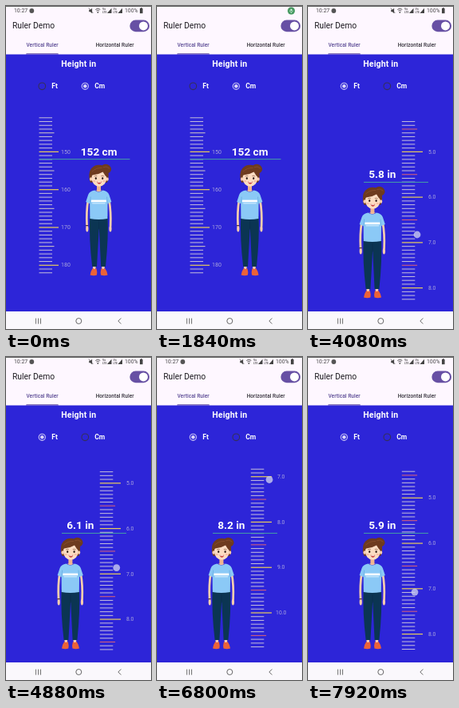
An HTML page with a canvas that plays this animation: 182 px wide and 404 px high, repeating every 8000 ms.

```html
<!DOCTYPE html>
<html lang="en">
<head>
<meta charset="utf-8">
<title>Ruler Demo</title>
<style>
  html, body { margin: 0; width: 100%; height: 100%; overflow: hidden; background: #fef7ff; }
  canvas { display: block; width: 182px; height: 404px; }
</style>
</head>
<body>
<canvas id="stage"></canvas>
<script>
const W = 182, H = 404, LOOP = 8000;
const STEP = 4.73, RULER_TOP = 139.8;
const BLUE = '#2d25d8', PURPLE = '#6750a4', INK = '#1d1b20';
const MIC_ON = 480, MIC_OFF = 2080, TO_FEET = 1920, TOUCH = 3840;

// [time, first visible inch, finger x, finger y]
const DRAG = [
  [4080, 51, 137, 286],
  [5600, 64.7, 140.5, 227],
  [6800, 81.9, 141, 153.5],
  [6920, 82.2, 141, 152.5],
  [7920, 52.3, 134, 294],
  [8000, 51.6, 134, 297]
];

const canvas = document.getElementById('stage');
const c = canvas.getContext('2d');
const dpr = window.devicePixelRatio || 1;
canvas.width = W * dpr;
canvas.height = H * dpr;

// Monotone cubic through one column of the drag keys
function track(t, col) {
  const k = DRAG, last = k.length - 1;
  if (t <= k[0][0]) return k[0][col];
  if (t >= k[last][0]) return k[last][col];
  let i = 0;
  while (t > k[i + 1][0]) i++;
  const rate = j => (k[j + 1][col] - k[j][col]) / (k[j + 1][0] - k[j][0]);
  const slope = j => {
    if (j === 0 || j === last) return 0;
    const a = rate(j - 1), b = rate(j);
    return a * b <= 0 ? 0 : 2 * a * b / (a + b);
  };
  const h = k[i + 1][0] - k[i][0], u = (t - k[i][0]) / h;
  const u2 = u * u, u3 = u2 * u;
  return (2 * u3 - 3 * u2 + 1) * k[i][col] + (u3 - 2 * u2 + u) * h * slope(i) +
         (3 * u2 - 2 * u3) * k[i + 1][col] + (u3 - u2) * h * slope(i + 1);
}

function rect(x, y, w, h, fill) {
  c.fillStyle = fill;
  c.fillRect(x, y, w, h);
}

function oval(x, y, rx, ry, fill, turn = 0) {
  c.beginPath();
  c.ellipse(x, y, rx, ry, turn, 0, Math.PI * 2);
  c.fillStyle = fill;
  c.fill();
}

function ring(x, y, r, color, width) {
  c.beginPath();
  c.arc(x, y, r, 0, Math.PI * 2);
  c.strokeStyle = color;
  c.lineWidth = width;
  c.stroke();
}

function path(d, fill, stroke, width = 1) {
  const p = new Path2D(d);
  if (fill) { c.fillStyle = fill; c.fill(p); }
  if (stroke) { c.strokeStyle = stroke; c.lineWidth = width; c.stroke(p); }
}

function text(s, x, y, size, color, weight = 400, align = 'left', gap = 0) {
  c.font = `${weight} ${size}px Roboto, sans-serif`;
  c.letterSpacing = gap + 'px';
  c.textAlign = align;
  c.fillStyle = color;
  c.fillText(s, x, y);
}

function signal(x) {
  text('Vo', x, 5.3, 3.6, '#444', 500);
  text('LTE', x, 8.9, 3.4, '#444', 500);
  path(`M${x + 6} 9 L${x + 11.5} 9 V2.8 Z`, '#444');
}

function statusBar(t) {
  rect(0, 0, W, 1, '#666');
  if (t >= MIC_ON && t < MIC_OFF) {
    oval(168.5, 6, 4.8, 4.8, '#46996150');
    oval(168.5, 6, 4.5, 4.5, '#469961');
    path('M168.5 3.8 V6', null, '#e8fff0', 1.8);
    path('M166.5 5.6 Q166.6 7.7 168.5 7.7 Q170.4 7.7 170.5 5.6 M168.5 7.7 V9', null, '#e8fff0', .6);
    return;
  }
  text('10:27', 10, 8.3, 6.9, '#444');
  oval(32.3, 6, 2.9, 2.9, '#555');
  path('M104.2 4.7 h1.7 l2.2 -2 v6.6 l-2.2 -2 h-1.7 Z', '#444');
  path('M103.8 2.6 L109.3 9', null, '#444', .7);
  path('M112.3 4.5 Q115.3 1.5 118.3 4.5 M113.5 6.1 Q115.3 4.3 117.1 6.1', null, '#444', .9);
  oval(115.3, 7.9, .9, .9, '#444');
  signal(121);
  signal(134.5);
  text('100%', 149, 8.3, 6.9, '#444');
  rect(168, 3, 3.6, 6.2, '#444');
  rect(169, 2.1, 1.6, 1, '#444');
}

function header() {
  text('Ruler Demo', 8, 27.8, 10.3, INK);
  c.beginPath();
  c.roundRect(155.4, 17.6, 24.6, 14.6, 7.3);
  c.fillStyle = PURPLE;
  c.fill();
  oval(172.5, 24.9, 5.5, 5.5, '#fff');
  text('Vertical Ruler', 45.6, 51.4, 6.5, '#574792', 500, 'center', .08);
  text('Horizontal Ruler', 136.6, 51.4, 6.5, '#333039', 500, 'center', .06);
  c.beginPath();
  c.roundRect(25, 59.2, 41, 1.4, [1.3, 1.3, 0, 0]);
  c.fillStyle = PURPLE;
  c.fill();
}

function radio(x, label, on) {
  ring(x, 100.3, on ? 4.1 : 4.3, on ? '#cbc6f4' : '#353058', 1.1);
  if (on) oval(x, 100.3, 2.3, 2.3, '#d8d2fa');
  text(label, x + 11.9, 103.3, 8.6, '#fff', 700);
}

function ruler(r, start) {
  const first = Math.ceil(start - 1e-6);
  for (let n = first; n < first + r.count; n++) {
    const y = RULER_TOP + (n - start) * STEP;
    const major = n % r.unit === 0, half = n % r.unit === r.unit / 2;
    const len = major ? r.long : half ? r.mid : 16.5;
    const thick = major ? 1.2 : 1;
    rect(r.x, y - thick / 2, len, thick, major ? '#e8cc5c' : half ? r.halfColor : '#c4bddb');
    if (major) text(r.label(n), r.labelX, y + 2.2, r.size, '#aaa5dd', 400, 'center');
  }
}

const CM = {
  x: 41.5, unit: 10, count: 42, long: 24.5, mid: 19, halfColor: '#d2c9c4',
  labelX: 75, size: 7, label: n => String(n)
};
const FEET = {
  x: 117.8, unit: 12, count: 48, long: 26.2, mid: 19.3, halfColor: '#dc6274',
  labelX: 155.7, size: 6.8, label: n => (n / 12).toFixed(1)
};

function reading(label, x, y, left, right) {
  text(label, x, y - 5, 13.6, '#fff', 700, 'center');
  rect(left, y - .5, right - left, 1, '#45a0a4');
}

// Origin: middle of the body, top of the hair
function person(x, y) {
  const skin = '#f9cdae', hair = '#6e3b1f', shirt = '#8bc9f6', denim = '#0b3553', shoe = '#ec6238';
  c.save();
  c.translate(x, y);
  c.lineCap = 'round';

  // Arms
  path('M-13.2 46 Q-15.6 60 -14.6 78', null, skin, 2.7);
  path('M13.2 46 Q15.8 60 15 78', null, skin, 2.7);
  oval(-14.4, 81.5, 1.6, 4, skin);
  oval(14.8, 81.5, 1.6, 4, skin);
  path('M-15.8 77.6 H-13.4', null, '#4a3038', 1.2);

  // Legs and shoes
  path('M-7.4 126 L-6.8 133 H-4 L-3.2 126 Z M3.6 126 L4.4 133 H7.2 L8 126 Z', skin);
  path('M-11 66 H11.4 Q12.6 92 8.8 129 H3 L.6 80 L-2.2 129 H-8 Q-12.2 94 -11 66 Z', denim);
  path('M.4 72 V82', null, '#092d4b', .7);
  path('M-7.4 131 Q-5 133 -2.8 131 Q-1.4 136 -2.2 139.4 Q-6 141 -10.6 139.4 Q-10.4 135.5 -7.4 131 Z', shoe);
  path('M3.4 131 Q5.6 133 8 131 Q11.2 135.5 11.4 139.4 Q7 141 2.8 139.4 Q2 136 3.4 131 Z', shoe);

  // Shirt
  path('M-5 33.5 Q-11.5 34.5 -13 39 L-16 48 L-11 50.2 L-10.8 69 Q0 71 11.2 69 L11.4 50.2 L16.2 48 L13.2 39 Q11.5 34.5 5.4 33.5 Q0 37.4 -5 33.5 Z', shirt);
  path('M-10.8 50 L-10 42 M11.2 50 L10.4 42', null, '#64a9df', .7);
  rect(-9.2, 45.6, 18.8, 2.6, '#fff');
  rect(-8, 49.4, 16.4, .9, '#e2f3ff');

  // Head
  oval(9.4, 6.6, 6.6, 5.7, hair, .35);
  oval(.4, 13.2, 12, 11.4, hair);
  path('M-11.5 13 Q-12.6 20 -9.8 24 L-6 23 Z M12.3 13 Q13 20 10.4 24 L6 23 Z', hair);
  rect(-2.2, 26, 5, 8, '#efb48e');
  path('M-4 33.4 Q0 37 4.4 33.4 Z', '#f3bd99');
  oval(-9.6, 19.5, 1.6, 2.3, skin);
  oval(11, 19.5, 1.6, 2.3, skin);
  oval(.7, 18.5, 9.4, 10.2, '#fcdcc2');
  path('M-10.4 18 Q-9.6 8 .6 6 Q10.6 7 11.4 18 Q8 15.4 5.4 10.4 Q-.6 14 -7.6 14.6 Q-9.4 15.6 -10.4 18 Z', hair);
  path('M-8 10 Q-3 5 4 5.5 M6 4.6 Q10 2.6 13.6 6', null, '#8f5330', .7);
  oval(-3.4, 18.6, 1.1, 1.5, '#38231c');
  oval(5, 18.6, 1.1, 1.5, '#38231c');
  path('M-5.2 15.8 Q-3.6 14.8 -2.2 15.5 M3.6 15.5 Q5.2 14.8 6.6 15.8', null, hair, .6);
  oval(-5.4, 22, 1.6, 1, '#f8b8a2');
  oval(6.8, 22, 1.6, 1, '#f8b8a2');
  path('M-2.1 22.6 Q.7 23.8 3.7 22.6 Q2.9 25.8 .8 25.8 Q-1.3 25.8 -2.1 22.6 Z', '#c9463f');
  path('M-1.4 23 Q.7 23.8 3 23 L2.5 24 H-.9 Z', '#fff');
  c.restore();
}

function navBar() {
  rect(0, 382, W, 22, '#faf8fc');
  for (let x = 37.5; x < 45; x += 3) rect(x - .4, 390.6, .9, 7, '#666');
  ring(91.3, 394, 3.5, '#666', 1);
  path('M144.3 390.5 L140.8 394 L144.3 397.5', null, '#666', 1);
}

function draw(t) {
  c.setTransform(dpr, 0, 0, dpr, 0, 0);
  rect(0, 0, W, H, '#fef7ff');
  statusBar(t);
  header();
  rect(0, 60.5, W, 321.5, BLUE);
  text('Height in', 91.2, 76.2, 10.5, '#fff', 700, 'center', .15);

  const feet = t >= TO_FEET;
  radio(45.3, 'Ft', feet);
  radio(99.3, 'Cm', !feet);
  if (feet) {
    const start = track(t, 1);
    const inches = Math.floor(start + 17 + 1e-6);
    ruler(FEET, start);
    reading(`${Math.floor(inches / 12)}.${inches % 12} in`, 93.3, 220.4, 70, 151);
    person(80.6, 225);
  } else {
    ruler(CM, 141);
    reading('152 cm', 116.6, 191.6, 42, 155.5);
    person(116.2, 197);
  }
  navBar();
  if (t >= TOUCH) oval(track(t, 2), track(t, 3), 4.4, 4.4, 'rgba(205,207,240,.78)');
}

const begin = performance.now();
function frame() {
  draw((performance.now() - begin) % LOOP);
  requestAnimationFrame(frame);
}
frame();
</script>
</body>
</html>
```
